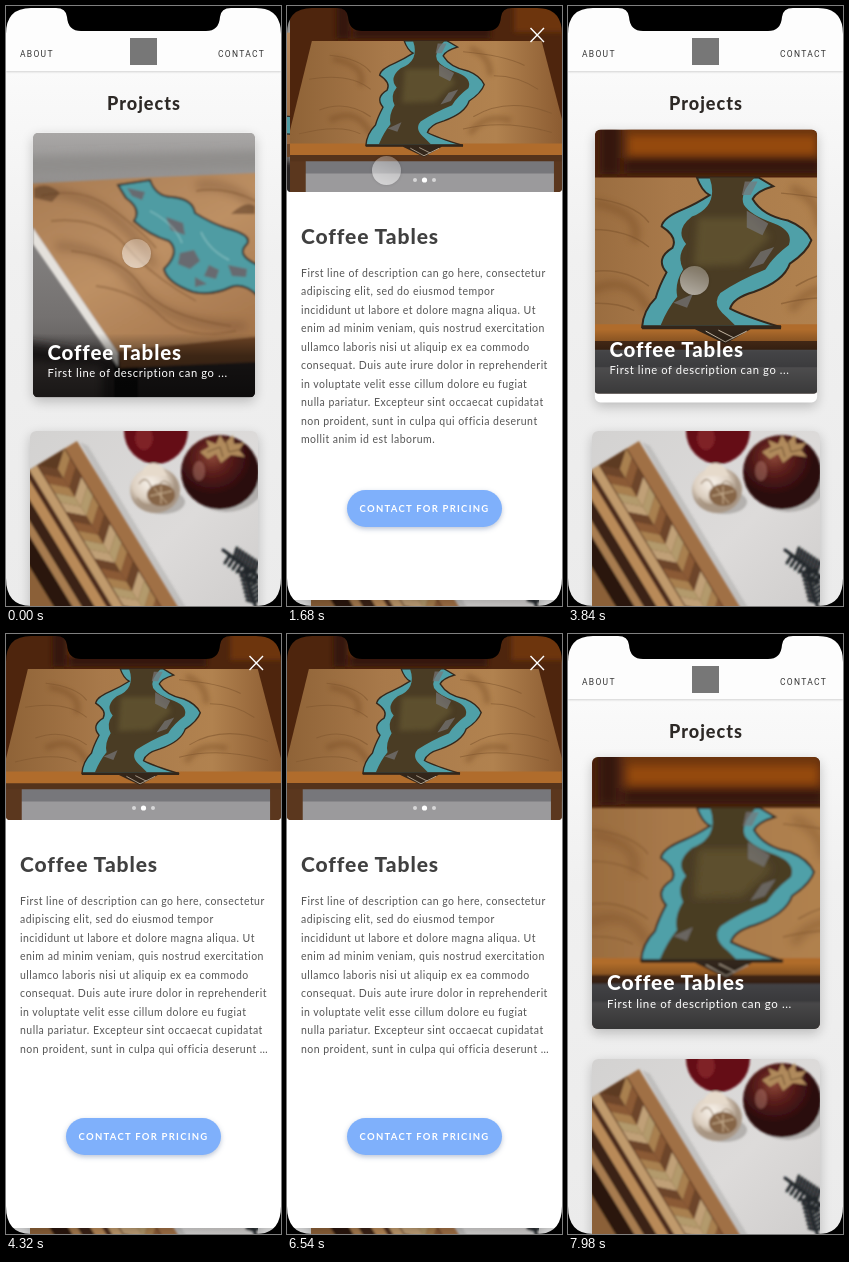
Animation, 275 px wide and 600 px high, one loop 8 s. Source, as an HTML page:

```html
<!DOCTYPE html>
<html lang="en">
<head>
<meta charset="utf-8">
<title>Projects</title>
<style>
html, body { margin: 0; width: 100%; height: 100%; overflow: hidden; background: #000; }
#stage { position: relative; width: 275px; height: 600px; overflow: hidden; background: linear-gradient(#fafafa 65px, #f0f0f0 250px, #ebebeb); font-family: Lato, sans-serif; }
#stage div, #stage svg, #stage span { position: absolute; white-space: nowrap; }
.nav { width: 275px; height: 65px; background: #fdfdfd; box-shadow: 0 1px 2px rgba(0,0,0,.16); font: 8.5px/12px Roboto, sans-serif; letter-spacing: 1.3px; color: #333; }
.logo { left: 124px; top: 32px; width: 27px; height: 27px; background: #777; }
.head { left: 101px; top: 86px; font-weight: 800; font-size: 18px; line-height: 22px; letter-spacing: 1px; color: #2d2926; }
.shadow { box-shadow: 0 4px 12px rgba(0,0,0,.22); }
#next { left: 24px; top: 425px; border-radius: 6px; }
#card { overflow: hidden; background: #fff; }
#photo { left: 0; top: 0; overflow: hidden; border-radius: 0 0 4px 4px; }
#shade { left: 0; bottom: 0; width: 100%; height: 66px; background: linear-gradient(transparent, rgba(0,0,0,.45) 35%, rgba(0,0,0,.66)); }
#title { font-weight: 800; font-size: 21px; line-height: 26px; letter-spacing: .9px; }
#first, .line { line-height: 18px; }
.line { left: 14px; font-size: 10.5px; letter-spacing: .47px; color: #555; }
#button { left: 60px; top: 484px; width: 155px; height: 37px; border-radius: 19px; box-shadow: 0 2px 5px rgba(60,90,140,.35); color: #fff; font-weight: 700; font-size: 9.5px; line-height: 37px; text-align: center; letter-spacing: 1.25px; }
#finger { width: 29px; height: 29px; margin: -14.5px; border-radius: 50%; background: linear-gradient(200deg, rgba(255,255,255,.25), rgba(255,255,255,.6)); box-shadow: 0 0 3px rgba(0,0,0,.15); }
</style>
</head>
<body>
<div id="stage">
  <div class="nav">
    <span style="left:14px;top:42px">ABOUT</span>
    <span style="left:212px;top:42px">CONTACT</span>
    <div class="logo"></div>
  </div>
  <div class="head">Projects</div>

  <svg id="next" class="shadow" width="228" height="220" viewBox="24 425 228 220">
    <defs>
      <filter id="soft"><feGaussianBlur stdDeviation=".8"/></filter>
      <filter id="haze"><feGaussianBlur stdDeviation="4"/></filter>
      <linearGradient id="marble" x2="1" y2="1"><stop stop-color="#d3d2d1"/><stop offset=".55" stop-color="#dddbda"/><stop offset="1" stop-color="#cbc9c8"/></linearGradient>
      <radialGradient id="onion" cx=".4" cy=".3"><stop stop-color="#8a4536"/><stop offset=".45" stop-color="#5a1d1b"/><stop offset="1" stop-color="#2c0c0e"/></radialGradient>
      <radialGradient id="garlic" cx=".4" cy=".35"><stop stop-color="#f7f1ea"/><stop offset=".7" stop-color="#dccfc0"/><stop offset="1" stop-color="#a89684"/></radialGradient>
    </defs>
    <path fill="url(#marble)" d="M24 425h228v220H24z"/>
    <g filter="url(#soft)">
      <path fill="#8d8b89" opacity=".3" d="M74 436l8 4 100 165h-16z"/>
      <g id="board" transform="matrix(.52 .854 -.854 .52 71 435)"></g>
      <ellipse cx="150" cy="425" rx="32" ry="33" fill="#651019"/>
      <ellipse cx="138" cy="432" rx="9" ry="12" fill="#9a2f35" opacity=".5"/>
      <ellipse cx="156" cy="496" rx="23" ry="12" fill="#8c8884" opacity=".5"/>
      <ellipse cx="149" cy="484" rx="25" ry="23" fill="url(#garlic)"/>
      <path d="M138 462q10-10 19 0l4 8h-26z" fill="#e6dacb"/>
      <path d="M133 478q8-12 14 8M165 480q-10-12-14 6M131 492q9 12 18 4" fill="none" stroke="#a4907a" stroke-width="1.3"/>
      <ellipse cx="155" cy="489" rx="14" ry="11" fill="#866546"/>
      <path d="M144 490l22-5M148 482l13 15M155 480v18" stroke="#cdb595" fill="none"/>
      <ellipse cx="220" cy="474" rx="39" ry="32" fill="#77716e" opacity=".4"/>
      <ellipse cx="214" cy="466" rx="39" ry="37" fill="url(#onion)"/>
      <path d="M194 446l9-5-3-7 10 4 4-9 5 8 8-8 1 9 10-1-5 7 6 7-14-2-10 8-5-9-8 5z" fill="#b08a5c"/>
      <path d="M201 446l13-5 3 10M219 432l4 14 13-3" stroke="#68492b" fill="none"/>
      <ellipse cx="193" cy="465" rx="6" ry="10" fill="#c48e7d" opacity=".4"/>
      <path id="pine" stroke="#24282a" stroke-width="3" stroke-linecap="round" fill="none"/>
    </g>
  </svg>

  <div id="card" class="shadow">
    <div id="photo">
      <svg class="pic" viewBox="0 0 402 272">
        <defs>
          <linearGradient id="floor" x2="0" y2="1"><stop stop-color="#a9a7a6"/><stop offset=".25" stop-color="#8c8a89"/><stop offset=".7" stop-color="#747170"/><stop offset="1" stop-color="#4a4644"/></linearGradient>
          <linearGradient id="oak" x2="1" y2="1"><stop stop-color="#9c7049"/><stop offset=".5" stop-color="#bd9064"/><stop offset="1" stop-color="#94633b"/></linearGradient>
        </defs>
        <path fill="url(#floor)" d="M0 0h402v272H0z"/>
        <g filter="url(#soft)" transform="translate(38 -123) translate(138 259) scale(1.0256) translate(-138 -259)">
          <g filter="url(#haze)">
            <path fill="#908e8c" d="M-40 152L370 142v18L-40 172z"/>
            <path fill="#262220" d="M-40 326L110 350H370v60H-40z"/>
            <path fill="#4a4341" d="M-40 350L95 362v50H-40z"/>
          </g>
          <path fill="#111" d="M108 346h24v60h-24z"/>
          <path fill="url(#oak)" d="M-40 181L130 172 249 167 370 164V325L249 333 112 347 27 222-40 130z"/>
          <path fill="none" stroke="#6b4529" stroke-width="9" opacity=".35" filter="url(#haze)" d="M28 185q50 0 80 26t40 50M50 240q50 0 80 40t110 40M190 180q30-6 60 20"/>
          <path fill="#6e4526" d="M112 345L249 331 370 322v18L249 356 114 362z"/>
          <path fill="#e4e1dc" d="M27 222L112 347v14L27 238z"/>
          <path fill="none" stroke="#7c5230" stroke-width="1.4" opacity=".6" d="M35 190q40-10 70 12t45 40M45 215q50-5 75 25t70 55M65 245q50 5 70 35t90 40M90 280q40 5 65 30t75 15M190 185q30-5 60 10"/>
          <path fill="#52351f" opacity=".5" d="M28 182q14-7 26 5l-8 9-18-4zM225 208q14-14 24-8v8z"/>
          <g transform="translate(3 0)">
            <path fill="#4f9ca3" stroke="#33302b" stroke-width="2" d="M109 179L141 174Q147 191 163 191 184 193 186 207 202 217 217 222 244 229 238 238 226 249 249 259L300 280 370 285V310L300 306 249 290Q235 276 222 281 203 290 184 286 158 277 155 263 172 246 160 235 140 229 125 215 133 203 117 192z"/>
            <path fill="#6b6267" opacity=".85" d="M118 182l18 4-3 8-10-4zM157 211l17 6 2 12-14-5zM171 247l14-3 6 11-10 8-12-5zM200 259l10 5-3 9-12-3zM219 259l19 4-1 8-14-1zM186 271l12 7-12 3z"/>
            <path fill="none" stroke="#a2d0cf" stroke-width="1.4" opacity=".6" d="M141 205q25 13 32 32M192 226q8 18 28 28"/>
          </g>
        </g>
      </svg>
      <svg class="pic" viewBox="0 0 402 272">
        <defs><linearGradient id="slab" x2="1"><stop stop-color="#8f6337"/><stop offset=".35" stop-color="#a8794a"/><stop offset=".75" stop-color="#b1824f"/><stop offset="1" stop-color="#8a5a30"/></linearGradient></defs>
        <path fill="#4e250d" d="M0 0h402v272H0z"/>
        <g filter="url(#soft)" transform="translate(38 -123)">
          <g filter="url(#haze)">
            <path fill="#6d340d" d="M55 113h200v46H55zM290 113h90v48h-90z"/>
            <path fill="#954a0c" d="M60 132h190v18H60z"/>
            <path fill="#351907" d="M55 154h200v16H55zM30 113h20v58H30z"/>
          </g>
          <path fill="#77777b" d="M-38 340h402v60H-38z"/>
          <path fill="#9b9a9c" d="M-38 368h402v32H-38z"/>
          <path fill="#5b371e" d="M-38 340h23v60h-23zM348 340h16v60h-16z"/>
          <path fill="url(#slab)" d="M-6 174H330L364 305V325H-38V305z"/>
          <path fill="none" stroke="#6e431d" stroke-width="9" opacity=".35" filter="url(#haze)" d="M25 200q50 10 40 40M20 290q40-20 60 20M225 185q30 10 30 40M225 310q20-30 60-20"/>
          <path fill="#b06c2c" d="M-38 324H364V341L-38 344z"/>
          <path fill="#55331b" d="M-38 341H364V350H-38z"/>
          <path fill="none" stroke="#80582f" stroke-width="1.5" opacity=".6" d="M20 195q45 5 60 25M-10 230q60-10 90 15M5 275q40-15 75 10M-25 310q60-15 90 0M215 190q60 5 90 20M260 225q35 0 65 20M230 285q50-30 115-5M215 303q60-15 130 5"/>
          <path fill="#4fa0a8" stroke="#34281c" stroke-width="2" d="M129 174Q134 188 142 192 128 201 116 206 94 215 93 224 110 235 104 246 86 257 98 271 90 286 87 297 74 310 73 327H215Q178 316 163 308 166 297 187 291 218 280 224 262 242 250 246 238 240 225 222 218 196 213 186 196 190 188 207 183L192 174z"/>
          <path fill="#4a3c24" d="M142 174H188Q172 190 177 202 184 213 208 221 228 229 223 243 207 255 199 268 172 279 153 292 143 304 160 317L168 325H92Q99 308 109 296 106 282 115 268 108 254 118 242 106 228 124 214 152 203 142 174z"/>
          <path fill="#6a5d36" opacity=".6" filter="url(#haze)" d="M130 215h54l20 20-30 28-48 2z"/>
          <path fill="#77777a" opacity=".7" d="M178 178h13l-7 14-9 0zM180 208l22 13-6 12-16-8zM194 250l14-5-11 17-15 5zM105 302l20-9-6 14z"/>
          <path fill="#33261a" d="M73 325H215v4H73zM127 329H184L158 344z"/>
          <path fill="none" stroke="#d8c9b4" d="M138 331l20 11M151 330l16 8M180 331l-22 11"/>
        </g>
      </svg>
      <div id="shade"></div>
    </div>
    <div id="title">Coffee Tables</div>
    <div id="first"></div>
    <div id="body"></div>
    <div id="button">CONTACT FOR PRICING</div>
  </div>

  <div id="finger"></div>
  <svg width="275" height="600" style="left:0;top:0">
    <g id="chrome" fill="#fff">
      <path d="M243.500 22l13.500 14M257 22l-13.500 14" stroke="#fff" stroke-width="1.4"/>
      <g id="dots"><circle cx="128" cy="174"/><circle cx="137.500" cy="174"/><circle cx="147" cy="174"/></g>
    </g>
    <path fill-rule="evenodd" d="M0 0H275V600H0zM0 28Q0 2 25 2H50Q60 2 61 11 62 25 75 25H200Q213 25 214 11 215 2 225 2H250Q275 2 275 28V572Q275 600 250 600H25Q0 600 0 572z"/>
  </svg>
</div>

<script>
const LOOP = 8000;
const $ = id => document.getElementById(id);
const lerp = (a, b, k) => a + (b - a) * k;
const clamp = v => Math.min(1, Math.max(0, v));
const seg = (t, start, length) => clamp((t - start) / length);
const inOut = k => k < .5 ? 2 * k * k : 1 - 2 * (1 - k) ** 2;
const out = k => 1 - (1 - k) ** 3;
const hold = (t, from, to, fade) => seg(t, from, fade) - seg(t, to, fade);
const grey = v => `rgb(${v},${v},${v})`;
const mix = (a, b, k) => `rgb(${a.map((v, i) => lerp(v, b[i], k))})`;
const place = (el, x, y, w, h) => {
  el.style.left = x + 'px';
  el.style.top = y + 'px';
  if (w !== undefined) { el.style.width = w + 'px'; el.style.height = h + 'px'; }
};

// Cutting board: long strips with two columns of slanted bars
const strips = [[0, '#a06f45'], [14, '#5d3a24'], [47, '#c09a6c'], [56, '#4b2b1a'], [61, '#b98a59'],
  [71, '#3a2317'], [82, '#a77c50'], [90, '#2a1911'], [106, '#8b6039']];
let board = strips.map(([v, c]) => `<path fill="${c}" d="M0 ${v}H260V140H0z"/>`).join('');
const woods = ['#a98050', '#6d4529', '#b39a6c', '#8b5a35', '#c0a077'];
for (let i = 0; i < 20; i++) {
  const u = i * 11;
  board += `<path fill="${woods[i * 3 % 5]}" d="M${u} 15h11l14 16h-11z"/><path fill="${woods[(i * 2 + 1) % 5]}" d="M${u + 14} 31h11l-14 15h-11z"/>`;
}
$('board').innerHTML = board;

// Pine twig: two stems lined with needles
let pine = 'M222 548L254 572M240 562Q242 580 250 602';
for (let i = 0; i < 8; i++) {
  pine += `M${224 + i * 4} ${549 + i * 3}l-7 -5M${224 + i * 4} ${549 + i * 3}l-5 8M${228 + i * 3} ${552 + i * 2}l3 -10`;
  pine += `M${241 + i} ${568 + i * 4}l-7 -2M${242 + i} ${568 + i * 4}l6 -4`;
}
$('pine').setAttribute('d', pine);

const lines = ['adipiscing elit, sed do eiusmod tempor', 'incididunt ut labore et dolore magna aliqua. Ut',
  'enim ad minim veniam, quis nostrud exercitation', 'ullamco laboris nisi ut aliquip ex ea commodo',
  'consequat. Duis aute irure dolor in reprehenderit', 'in voluptate velit esse cillum dolore eu fugiat',
  'nulla pariatur. Excepteur sint occaecat cupidatat', 'non proident, sunt in culpa qui officia deserunt',
  'mollit anim id est laborum.'];
$('body').innerHTML = lines.map((s, i) => `<div class="line" style="top:${(i + 1) * 18.44}px">${s}</div>`).join('');
const rows = $('body').children;
const pics = document.querySelectorAll('.pic');

// Touches: shown from, shown until, start x, y, end x, y, move start, move length
const touches = [
  [-300, 200, 130, 247, 130, 247, 0, 1],
  [1050, 1720, 190, 164, 99, 164, 1250, 350],
  [2400, 2930, 126, 183, 126, 312, 2575, 280],
  [3480, 3960, 126, 274, 126, 274, 0, 1],
  [5230, 5850, 121, 505, 121, 505, 0, 1],
  [6750, 7330, 134, 183, 134, 312, 6942, 280]
];

function draw(t) {
  const p = inOut(seg(t, 100, 550)) - inOut(seg(t, 2575, 280)) + inOut(seg(t, 3780, 550)) - inOut(seg(t, 6942, 280));
  const q = p ** 3;
  const press = hold(t, -300, 120, 150) + hold(t, 3560, 3860, 150);
  const slide = out(seg(t, 1250, 550));
  const x = lerp(24, 0, q), y = lerp(123, 0, p);
  const w = 275 - 47 * (1 - q), h = lerp(395, 594, p) - y;
  const photoH = lerp(272, 186, p ** 1.3);

  place($('card'), x, y, w, h);
  $('card').style.borderRadius = lerp(6, 0, p) + 'px';
  $('card').style.transform = `scale(${1 - .025 * press})`;
  place($('photo'), 0, 0, w, photoH);

  const k = (photoH + 72 * p * (1 - p)) / 272;
  pics.forEach((pic, i) => {
    place(pic, w / 2 + 24.5 * (1 - q) - 201 * k + (i - slide) * 275, photoH - 272 * k, 402 * k, 272 * k);
    pic.style.display = Math.abs(i - slide) < 1 ? 'block' : 'none';
  });
  $('shade').style.opacity = (1 - p) ** 2;

  place($('title'), lerp(15, 14, q), lerp(225, 230, p) - 13);
  $('title').style.color = grey(lerp(255, 64, p * p));

  const first = $('first');
  const firstY = lerp(247, 267, p ** 1.4) - 9;
  place(first, lerp(15, 14, q), firstY);
  first.style.fontSize = lerp(11.5, 10.5, q) + 'px';
  first.style.letterSpacing = lerp(.62, .47, q) + 'px';
  first.style.color = grey(lerp(255, 85, p));
  first.textContent = 'First line of description can go' + (p < .3 ? ' ...' : p > .6 ? ' here, consectetur' : '');

  const shown = seg(p, .65, .35);
  const clipped = t > 3400;
  place($('body'), 0, firstY);
  $('body').style.opacity = shown;
  rows[7].textContent = lines[7] + (clipped ? ' …' : '');
  rows[8].style.display = clipped ? 'none' : 'block';

  const tap = hold(t, 5330, 5680, 120);
  $('button').style.opacity = shown;
  $('button').style.background = mix([127, 176, 251], [79, 132, 138], tap);
  $('button').style.transform = `scale(${1 - .025 * tap})`;

  $('chrome').style.opacity = shown;
  [...$('dots').children].forEach((dot, i) => {
    const on = i === Math.round(slide);
    dot.setAttribute('r', on ? 2.6 : 2);
    dot.setAttribute('opacity', on ? 1 : .6);
  });

  const touch = touches.find(a => t < a[1] + 120);
  $('finger').style.opacity = touch ? hold(t, touch[0], touch[1], 120) : 0;
  if (touch) {
    const [, , x0, y0, x1, y1, start, length] = touch;
    const m = inOut(seg(t, start, length));
    place($('finger'), lerp(x0, x1, m), lerp(y0, y1, m));
  }
}

const begin = performance.now();
function tick() {
  draw((performance.now() - begin) % LOOP);
  requestAnimationFrame(tick);
}
tick();
</script>
</body>
</html>
```
